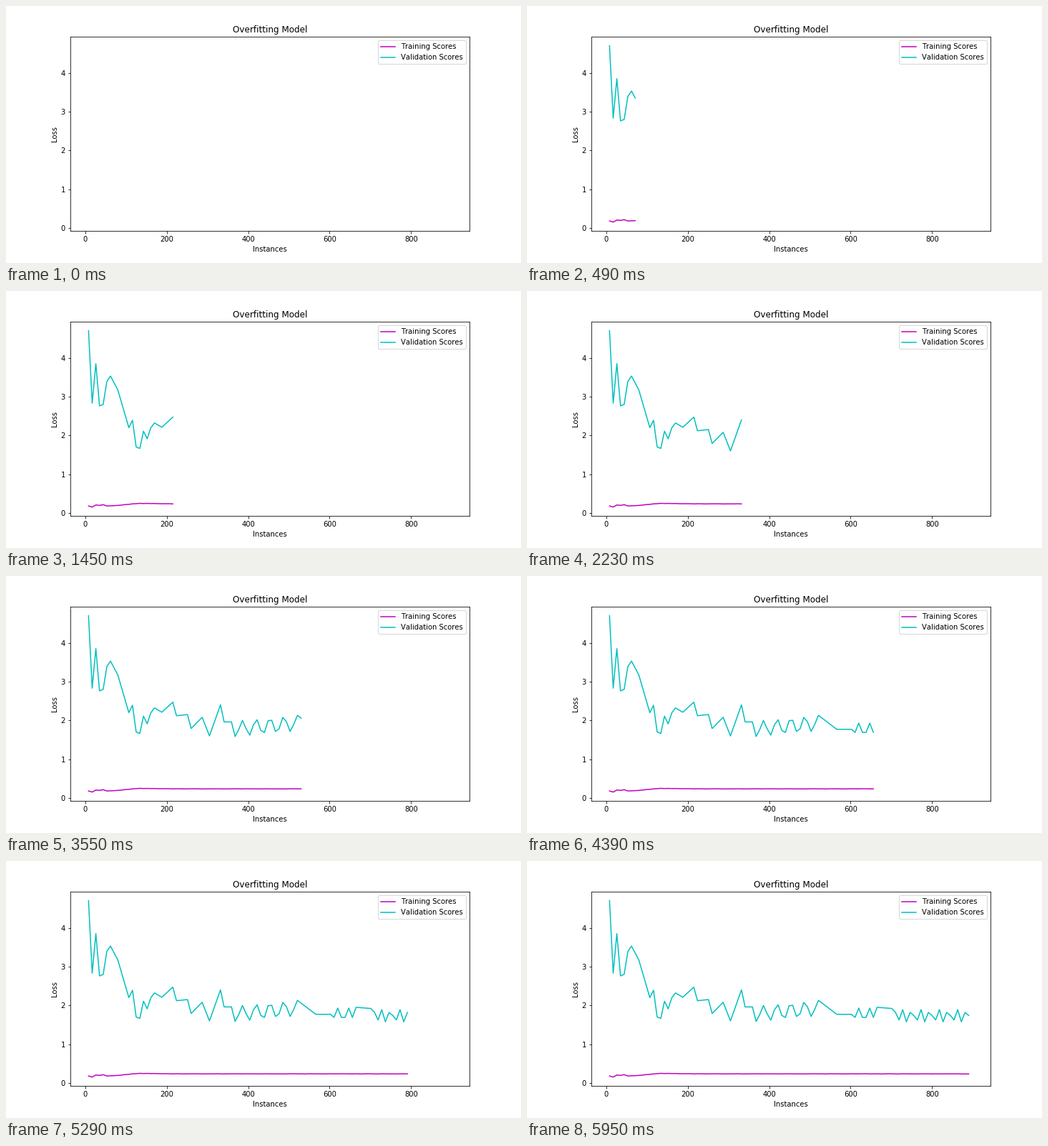
A matplotlib script for the animation above (6.01 s loop, 720 px wide and 360 px high).

```python
import matplotlib.pyplot as plt
import numpy as np
from matplotlib.animation import FuncAnimation

FRAMES = 100
LOOP_MS = 6010

plt.rcParams.update({
    "font.family": "DejaVu Sans",
    "font.size": 10,
    "text.kerning_factor": 6,
})

step = np.arange(FRAMES - 1)
instances = 8 + 9 * step


def through(*points):
    """Straight segments through a few (step, loss) points."""
    return np.interp(step, *zip(*points))


def ripple(first, last, period, peak, size):
    """A cosine ripple that lives only between two steps."""
    wave = size * np.cos(2 * np.pi * (step - peak) / period)
    return np.where((step >= first) & (step <= last), wave, 0)


# Validation loss: steep noisy start, then zigzags on a slow decline.
val_loss = through(
    (0, 4.70), (1, 2.83), (2, 3.85), (3, 2.76), (4, 2.80), (5, 3.39),
    (6, 3.53), (8, 3.17), (11, 2.20), (12, 2.39), (13, 1.70), (18, 2.32),
    (20, 2.21), (23, 2.47), (24, 2.12), (27, 2.15), (28, 1.79), (31, 2.08),
    (33, 1.60), (36, 2.40), (37, 1.96), (39, 1.96), (40, 1.78), (56, 1.92),
    (57, 2.13), (62, 1.77), (72, 1.77), (73, 1.95), (77, 1.92), (79, 1.73),
    (98, 1.73),
)
val_loss += ripple(14, 16, 2, 15, 0.16)
val_loss += ripple(40, 56, 3.75, 42, 0.2)
val_loss += ripple(67, 72, 3, 68, 0.16)
val_loss += ripple(79, 98, 2.5, 79.9, 0.165)

# Training loss: a small early wobble, then nearly flat.
train_loss = through(
    (0, 0.18), (1, 0.152), (2, 0.205), (3, 0.195), (4, 0.213), (5, 0.18),
    (8, 0.192), (12, 0.234), (14, 0.246), (23, 0.234), (98, 0.234),
)
rng = np.random.default_rng(4)
train_loss[8:] += rng.uniform(-0.003, 0.003, len(step) - 8)

fig, ax = plt.subplots(figsize=(10, 5), dpi=72, facecolor="white")
fig.subplots_adjust(left=0.125, right=0.9, bottom=0.125, top=0.88)

train_line, = ax.plot([], [], color="m", lw=1.5, label="Training Scores")
val_line, = ax.plot([], [], color="c", lw=1.5, label="Validation Scores")

ax.set_title("Overfitting Model")
ax.set_xlabel("Instances")
ax.set_ylabel("Loss")
ax.set_xlim(-36.55, 943.55)
ax.set_ylim(-0.0755, 4.9275)
ax.set_xticks(range(0, 801, 200))
ax.set_yticks(range(5))
ax.legend(loc="upper right")


def update(count):
    """Show the first `count` points of both curves."""
    train_line.set_data(instances[:count], train_loss[:count])
    val_line.set_data(instances[:count], val_loss[:count])
    return train_line, val_line


anim = FuncAnimation(fig, update, frames=FRAMES, interval=LOOP_MS / FRAMES,
                     repeat=True, repeat_delay=0)
plt.show()
```
